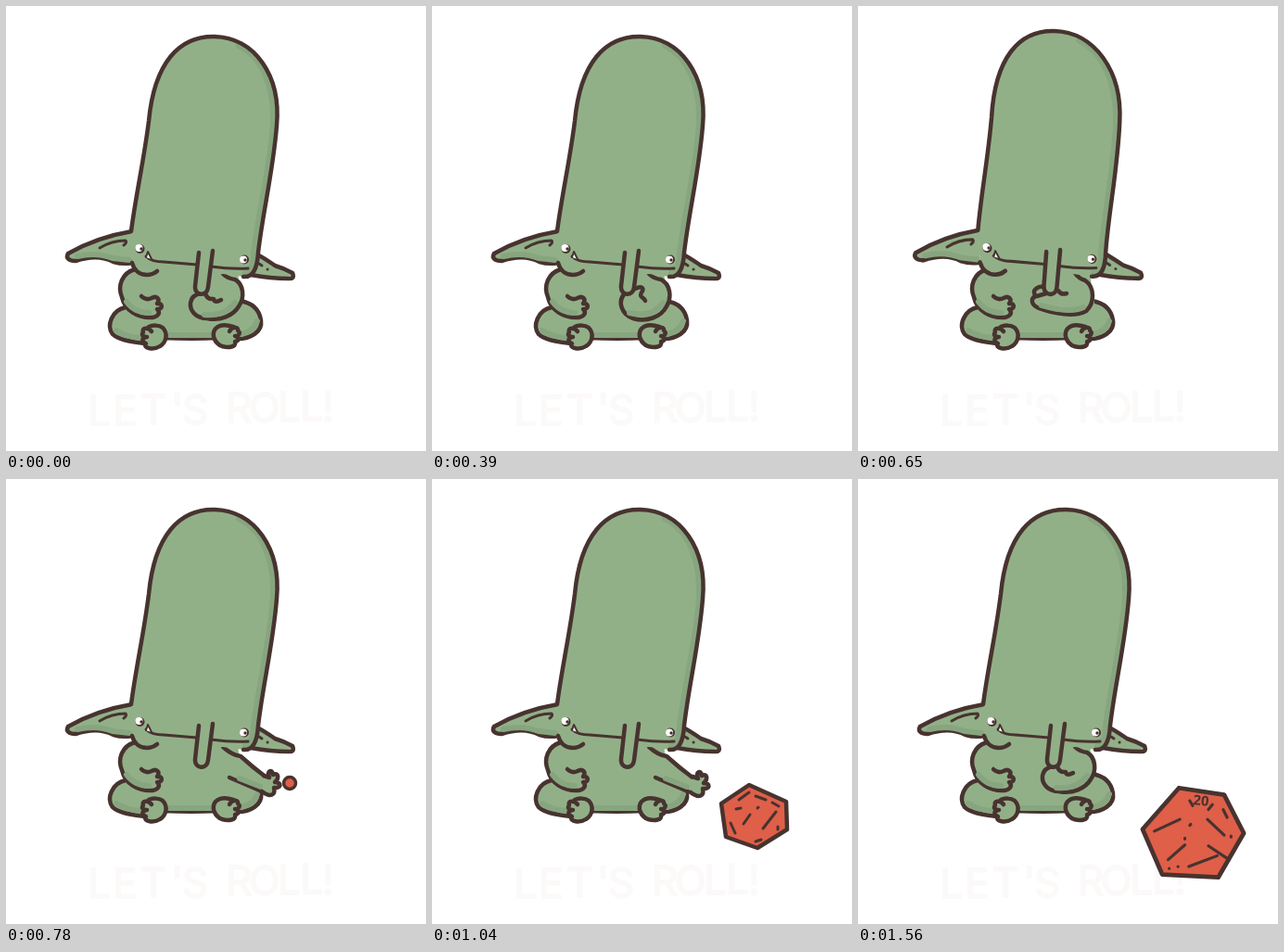
An HTML page that plays this animation: 453x480 px, repeating every 1690 ms.

```html
<!DOCTYPE html>
<html lang="en">
<head>
<meta charset="utf-8">
<title>Let's roll</title>
<style>
  html, body { margin: 0; width: 100%; height: 100%; overflow: hidden; background: #fff; }
  svg { display: block; width: 100vw; height: 100vh; }
  path, polygon { stroke: #47332f; stroke-width: 4.5; stroke-linecap: round; stroke-linejoin: round; fill: none; }
  .skin { fill: #92b088; }
  .flat { fill: #92b088; stroke: none; }
  .shade { stroke: #87a57f; stroke-width: 6; }
  .thin { stroke-width: 3; }
  .ink { fill: #47332f; }
  .white { fill: #fff; }
  .title { font: 400 44px Inter, "Open Sans", sans-serif; fill: #fcf9f9; stroke: #fcf9f9; stroke-width: 2; stroke-linejoin: round; }
  .pips { font: 700 14px "Open Sans", sans-serif; fill: #47332f; text-anchor: middle; }
  .arm, #mid, #late { display: none; }
</style>
</head>
<body>
<svg viewBox="0 0 453 480">
  <text class="title" x="88 115 145 178 190 237 262 293 317 341" y="452 452 451 450 451 449 449 448 447 448">LET'SROLL!</text>

  <g id="body">
    <path class="flat" d="M140 282 L250 286 L258 358 H140 L126 326 Z"/>
    <path class="skin" d="M129 325 C114 328 108 345 115 354 C122 361 138 362 149 364 L170 358 C190 359 210 359 228 358 L250 359 C263 359 277 352 275 339 C273 326 265 320 252 318"/>
    <path class="flat" d="M135 310 H255 V335 L245 352 H160 L130 335 Z"/>
    <path class="shade" d="M119 350 Q130 357 145 358 M176 355 Q200 355 222 355 M254 354 Q268 350 271 340"/>
    <path class="skin" d="M157 351 C153 346 146 347 148 352 C146 354 147 357 152 357 C146 358 146 362 151 364 C147 370 160 371 166 367 C173 363 175 353 169 347 C165 344 158 344 154 346"/>
    <path class="skin" d="M241 351 C244 345 251 346 250 350 C253 352 252 356 247 356 C252 357 252 361 247 362 C249 368 240 369 233 367 C225 364 221 354 226 348 C231 343 239 344 245 346"/>
    <path class="skin" d="M139 284 C125 288 120 302 125 314 C128 328 142 337 158 336 C164 335 167 331 163 327 C170 327 169 320 163 321 C167 316 162 312 157 315 C153 317 149 316 146 313"/>
    <path class="flat" d="M138 282 L172 284 L160 311 L143 307 Z"/>
    <path class="shade" d="M130 319 Q139 331 154 331"/>
  </g>

  <g class="arm" id="rest">
    <path class="skin" d="M234 289 Q239 294 247 295 C256 300 258 314 251 324 C245 334 231 340 217 337 C205 337 198 329 199 320 C200 314 204 311 210 310"/>
    <path class="shade" d="M214 333 Q236 335 247 320"/>
    <path d="M215 309 Q216 317 224 316 Q225 321 232 317"/>
  </g>
  <g class="arm" id="shake">
    <path class="skin" d="M234 289 Q239 294 247 295 C257 300 259 314 253 324 C247 336 231 341 217 337 C205 333 200 320 207 311"/>
    <path class="shade" d="M213 331 Q237 337 249 320"/>
    <path d="M219 305 C227 301 229 305 226 309 C223 315 228 313 230 318"/>
  </g>
  <g class="arm" id="windup">
    <path class="skin" d="M234 288 Q238 294 245 296 C256 304 255 321 246 329 C234 336 211 332 195 326 C186 322 186 315 192 313 C186 307 194 301 203 303"/>
    <path class="shade" d="M198 323 Q228 332 243 325"/>
    <path d="M193 313 L203 310 M216 307 Q219 312 225 310"/>
  </g>
  <g class="arm" id="throw">
    <path class="flat" d="M234 286 L256 299 L283 321 L280 339 L240 323 L225 300 Z"/>
    <path d="M234 289 Q244 298 253 299 Q266 311 281 322 M241 322 L276 337"/>
    <path class="shade" d="M252 323 L275 332"/>
    <path class="skin" id="hand" d="M278 320 L284 322 C281 315 287 312 288 319 C294 316 295 323 290 327 C298 327 297 334 289 333 C291 341 285 344 276 337"/>
  </g>

  <g id="head">
    <path class="skin" d="M136 243 C112 247 88 255 67 267 C64 272 68 275 75 275 C90 270 103 269 116 276 Q126 279 136 277"/>
    <path class="shade" d="M77 270 Q98 265 115 272 L133 274"/>
    <path class="thin" d="M101 261 Q114 253 129 253 Q131 255 127 258"/>
    <path class="skin" d="M270 267 C276 271 283 275 290 280 Q300 283 309 288 Q312 295 304 294 Q286 294 264 290"/>
    <path class="thin" d="M273 278 L276 280 M282 284 h.1"/>
    <path class="flat" d="M135 243 C140 204 149 165 154 124 C160 61 187 32 225 33 C268 34 297 75 292 129 C288 179 277 222 272 266 C271 282 267 293 256 292 L234 289 Q190 298 160 288 C146 294 138 288 136 277 Z"/>
    <path class="shade" d="M251 43 C276 55 290 87 288 129 C283 184 272 224 267 266 Q267 284 258 288"/>
    <path d="M135 243 C140 204 149 165 154 124 C160 61 187 32 225 33 C268 34 297 75 292 129 C288 179 277 222 272 266 C271 282 267 293 256 292"/>
    <path d="M136 277 C138 285 144 290 152 290 Q158 290 163 286"/>
    <path class="thin" d="M151 270 Q157 276 170 276 L206 279 M221 281 Q243 284 261 283"/>
    <path class="white thin" style="stroke-width:2" d="M151 271 L153 265 L157 273"/>
    <circle class="ink" cx="144.500" cy="262" r="5"/>
    <circle class="white" cx="143.500" cy="261" r="4"/>
    <circle class="ink" cx="146" cy="262" r="1.700"/>
    <circle class="ink" cx="257" cy="273.500" r="5"/>
    <circle class="white" cx="256" cy="273.500" r="4"/>
    <circle class="ink" cx="258" cy="274" r="1.700"/>
    <path class="skin" d="M208 266 L204 302 C203 313 217 314 218 303 L223 264"/>
  </g>

  <g id="die">
    <circle id="dot" r="6.500" fill="#dd5f49" stroke="#47332f" stroke-width="3.500"/>
    <polygon id="hex" style="fill:#df5f49"/>
    <path id="mid" class="thin" d="M-16 -17 L-5 -25 M-25 8 L-20 19 M-11 9 L-4 -1 M10 14 L24 -4 M2 -21 L13 -17 M20 -14 L27 -10 M-19 -7 L-14 -8 M2 28 L8 26 M26 12 L26 15 M4 -8 L5 -9"/>
    <g id="late">
      <path class="thin" d="M-39 -2 L-13 -14 M-25 27 L-8 12 M15 -14 L32 2 M16 13 L37 27 M-4 34 L25 23 M31 -24 L35 -16 M-3 -33 L0 -28 M20 -29 L16 -24 M-8 5 L-8 6 M-3 -8 L-2 -9 M39 3 L39 4 M-24 36 h.1 M-15 34 h.1"/>
      <text class="pips" x="5" y="-29" transform="rotate(6)">20</text>
    </g>
  </g>
</svg>
<script>
const STEP = 130, LOOP = 1690;
const $ = id => document.getElementById(id);
const poses = ["rest", "shake", "rest", "shake", "rest", "windup", "throw", "throw", "throw", "rest", "rest", "rest", "rest"];

// Die centre and size, starting at the throw
const roll = [
  [306, 328, 1], [326, 346, 0.6], [347, 363, 1], [353, 373, 0.87],
  [356, 380, 1], [358, 381, 1.03], [361, 382, 1.06]
];
const tumbling = "-5,-33 35,-15 36,15 4,35 -30,23 -35,-13";
const landed = "-14,-46 32,-39 52,0 26,45 -31,42 -51,-4";

const show = (el, on) => { el.style.display = on ? "inline" : "none"; };

function drawDie(n) {
  show($("die"), n >= 0);
  if (n < 0) return;
  const [x, y, size] = roll[n];
  const late = n > 2;
  $("die").setAttribute("transform", `translate(${x} ${y}) scale(${size})`);
  $("hex").setAttribute("points", late ? landed : tumbling);
  show($("dot"), n === 0);
  show($("hex"), n > 0);
  show($("mid"), n > 0 && !late);
  show($("late"), late);
}

function draw(step) {
  for (const arm of document.querySelectorAll(".arm")) show(arm, arm.id === poses[step]);
  $("head").setAttribute("transform", step === 5 ? "matrix(1 0 .036 1.022 -14.4 -6.7)" : "");
  $("hand").setAttribute("transform", step > 6 ? "translate(3 1)" : "");
  drawDie(step - 6);
}

const start = performance.now();
let last = -1;
function tick() {
  const step = Math.floor((performance.now() - start) % LOOP / STEP);
  if (step !== last) draw(last = step);
  requestAnimationFrame(tick);
}
tick();
</script>
</body>
</html>
```
